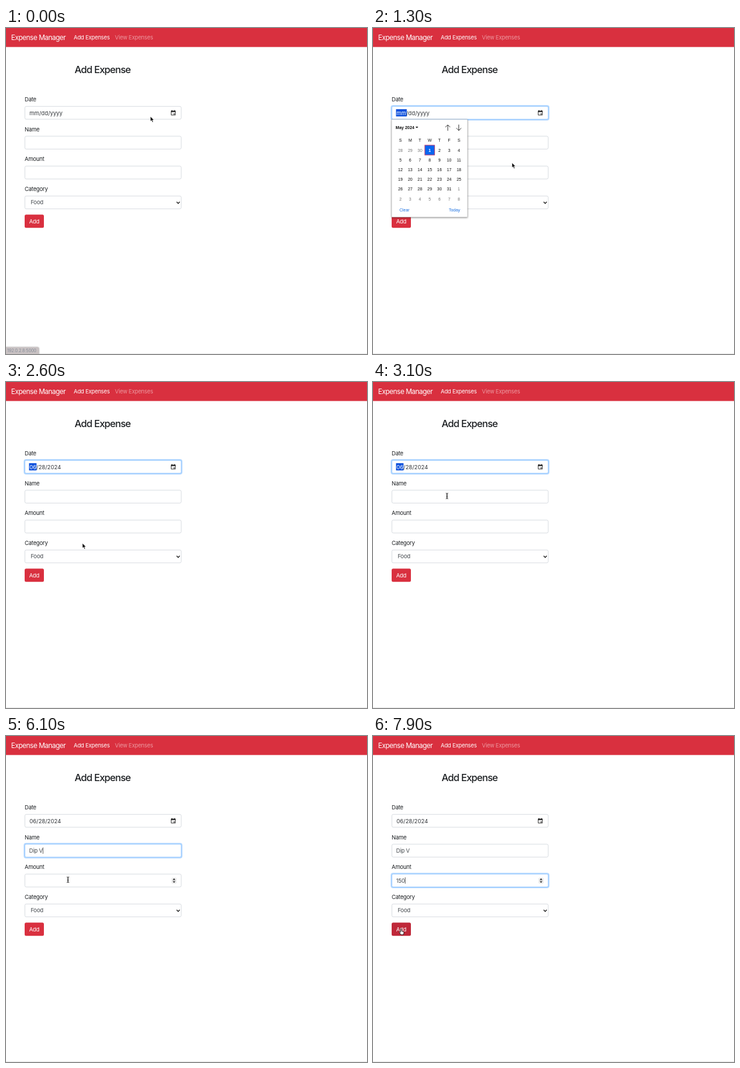
These frames come from a looping animation (600 by 542 pixels, 8000 ms). An HTML page:

```html
<!DOCTYPE html>
<html lang="en">
<head>
<meta charset="utf-8">
<title>Expense form</title>
<style>
html, body { margin: 0; width: 100%; height: 100%; overflow: hidden; background: #fff; }
svg { display: block; position: absolute; left: 0; top: 0; }
text { font: 9.25px Inter, sans-serif; letter-spacing: -.025em; fill: #1b1e21; white-space: pre; }
.brand { font-size: 11.55px; letter-spacing: -.045em; fill: #fff; }
.title { font-size: 16.2px; font-weight: 500; letter-spacing: -.05em; }
.white { fill: #fff; }
.value { fill: #43484d; }
.date { letter-spacing: 0; fill: #33373b; }
.field { fill: #fff; stroke: #ced4da; stroke-width: .8; }
.ring { fill: none; stroke: #007bff; stroke-opacity: .3; stroke-width: 2; }
.focus .field { stroke: #80bdff; }
.cal text { font: 7px "Liberation Sans", Arial, sans-serif; letter-spacing: 0; text-anchor: middle; fill: #111; }
.cal .head { font-weight: bold; text-anchor: start; }
.cal .out { fill: #777; }
.cal .picked { fill: #fff; font-weight: bold; }
.cal .link { fill: #1a6fe0; }
.line { fill: none; stroke: #222; stroke-width: .9; }
.panel { fill: #fff; filter: drop-shadow(0 1px 1.5px rgba(0,0,0,.4)); }
.hint { font-size: 7.3px; font-weight: 600; letter-spacing: 0; fill: #222; }
.status { font-size: 7px; letter-spacing: -.01em; fill: #858b97; }
</style>
</head>
<body>
<svg id="stage" width="600" height="542" viewBox="0 0 600 542"></svg>
<script>
const LOOP = 8000, STEP = 100, TEXT_X = 38.5;
const stage = document.getElementById('stage');

function el(tag, attrs, parent = stage, content) {
  const node = document.createElementNS('http://www.w3.org/2000/svg', tag);
  for (const key in attrs) node.setAttribute(key, attrs[key]);
  if (content !== undefined) node.textContent = content;
  parent.append(node);
  return node;
}
const group = (parent = stage, cls = '') => el('g', { class: cls }, parent);
const text = (x, y, str, cls = '', parent = stage) => el('text', { x, y, class: cls }, parent, str);
const rect = (x, y, width, height, attrs = {}, parent = stage) =>
  el('rect', { x, y, width, height, ...attrs }, parent);
const path = (d, attrs, parent = stage) => el('path', { d, ...attrs }, parent);
const show = (node, on) => { node.style.display = on ? '' : 'none'; };
const within = (t, a, b) => t >= a && t < b;

// Last value whose start time has passed
function valueAt(steps, t) {
  let value = steps[0][1];
  for (const [start, next] of steps) if (t >= start) value = next;
  return value;
}

// Page header
rect(0, 0, 600, 31.6, { fill: '#d9303f' });
text(8.6, 19.7, 'Expense Manager', 'brand');
text(112.5, 19.2, 'Add Expenses', 'white');
text(181, 19.2, 'View Expenses', 'white').setAttribute('opacity', .5);
text(114, 75.2, 'Add Expense', 'title');
rect(0, 541.3, 600, .7, { fill: '#ddd' });

// Form
function field(label, y) {
  text(31, y - 8, label);
  const g = group();
  const ring = rect(30.4, y - .8, 261.8, 23.6, { rx: 3, class: 'ring' }, g);
  rect(31.4, y + .3, 259.8, 21.4, { rx: 2.3, class: 'field' }, g);
  return { g, ring, y };
}
const dateField = field('Date', 130);
const nameField = field('Name', 179.6);
const amountField = field('Amount', 229.3);
const categoryField = field('Category', 279);

const mark = rect(38.3, 135, 17.8, 12, { fill: '#0b4fdc' });
const dateText = text(39, 144.5, '', 'date');
const month = el('tspan', {}, dateText);
const rest = el('tspan', {}, dateText);
path('M274.6 138.6h6.8v6.2h-6.8z', { class: 'line' });
path('M274.2 137.6h7.6v2.2h-7.6zM275.2 136.6h1.2v2h-1.2zM279.6 136.6h1.2v2h-1.2zM278.6 142h1.8v1.8h-1.8z', { fill: '#222' });

const nameText = text(TEXT_X, 194.2, '', 'value');
const amountText = text(TEXT_X, 243.9, '', 'value');
const caret = rect(0, 0, .7, 10.5, { fill: '#222' });
const spinner = group();
rect(275, 235.4, 8.6, 10, { rx: 2, fill: '#ececec' }, spinner);
path('M277 239.4l2.3-2.8 2.3 2.8zM277 241.4l2.3 2.8 2.3-2.8z', { fill: '#333' }, spinner);

text(41, 293.4, 'Food', 'value');
path('M283.6 289l2.6 2.7 2.6-2.7', { class: 'line', style: 'stroke-width:1.3' });
const button = rect(31, 310.3, 32, 22, { rx: 2.5 });
text(38.4, 324.8, 'Add', 'white');

// Calendar popup
function calendar(title, monthIndex, firstDay) {
  const g = group(stage, 'cal');
  rect(31, 152, 126, 162.3, { class: 'panel', stroke: '#a9a9a9', 'stroke-width': .5 }, g);
  const head = text(37.6, 167.6, title, 'head', g);
  const tipX = 39.6 + head.getComputedTextLength();
  path(`M${tipX} 164h4.4l-2.2 2.6z`, { fill: '#111' }, g);
  path('M124.3 170.8v-9.8m-4 4l4-4 4 4M142.6 160.6v9.8m-4-4l4 4 4-4', { class: 'line' }, g);
  const colX = i => 45.6 + 16.2 * (i % 7);
  const pick = rect(0, 0, 16.2, 16.2, { fill: '#0a66f0' }, g);
  if (monthIndex === 4) pick.setAttribute('stroke', '#c43a6c');
  [...'SMTWTFS'].forEach((day, i) => text(colX(i), 189, day, '', g));
  const cells = [];
  for (let i = 0; i < 42; i++) {
    const day = new Date(Date.UTC(2024, monthIndex, firstDay + i));
    const inside = day.getUTCMonth() === monthIndex;
    const y = 203 + 16.2 * Math.floor(i / 7);
    const node = text(colX(i), y + 2.5, day.getUTCDate(), inside ? '' : 'out', g);
    if (inside) cells[day.getUTCDate()] = { node, x: colX(i), y };
  }
  text(52.3, 304.5, 'Clear', 'link', g);
  text(135.3, 304.5, 'Today', 'link', g);
  return {
    g,
    select(day) {
      cells.forEach((cell, d) => cell.node.setAttribute('class', d === day ? 'picked' : ''));
      pick.setAttribute('x', cells[day].x - 8.1);
      pick.setAttribute('y', cells[day].y - 8.1);
    }
  };
}
const may = calendar('May 2024', 4, -2);
const june = calendar('June 2024', 5, -5);
may.select(1);

// Suggestion lists under the text inputs
function hints(y, items) {
  const g = group();
  const panel = group(g, 'panel');
  rect(88, y, 90, items.length * 20.8 + 4.4, { rx: 4 }, panel);
  path(`M97 ${y}l3-3 3 3z`, {}, panel);
  items.forEach((item, i) => text(95, y + 15.3 + 20.8 * i, item, 'hint', g));
  return g;
}
const nameHints = hints(207, ['Quiv', 'Shelf & Bag', 'Corvane', 'Glydek', 'Gas', 'Pizza']);
const amountHints = hints(256.7, ['25']);

const status = group();
path('M0 530.5h52q3 0 3 3v8.500h-55z', { fill: '#c9c2c3', style: 'filter:drop-shadow(0 0 1px rgba(0,0,0,.3))' }, status);
text(2, 539.2, '192.0.2.8:5000', 'status', status);

// Pointers, each with its hot spot at 0,0
const outline = { stroke: '#fff', 'stroke-width': .7, 'stroke-linejoin': 'round' };
const pointers = {
  arrow: path('M0 0v8.300l1.900-1.700 1.400 3.200 1.500-.7-1.400-3h2.500z', { fill: '#000', ...outline }),
  beam: path('M-2-4.700q2 0 2 1.200v7q0 1.200-2 1.200M2-4.700q-2 0-2 1.200v7q0 1.200 2 1.200M-1 .8h2', { class: 'line' }),
  hand: path('M-.9.700q.9-1.400 1.800 0v3.300l3 .7q1.200.4 1 1.800l-.8 3.300h-4.200l-2.700-3.700q-.3-1.200.9-1l1 .9z',
    { fill: '#fff', stroke: '#000', 'stroke-width': .8, 'stroke-linejoin': 'round' })
};

// time, x, y
const route = [
  [0, 240, 147], [300, 275, 141], [700, 278, 141], [900, 281, 143], [1000, 278, 146],
  [1100, 267, 162], [1200, 267, 162], [1300, 231, 224], [1500, 178, 190], [1700, 142, 166],
  [1800, 142, 166], [2000, 127, 175], [2200, 127, 205], [2400, 127, 268], [2600, 127, 268],
  [2900, 122, 214], [3000, 121, 202], [3100, 123, 189.5], [5700, 123, 189.5], [6000, 103, 239],
  [7300, 103, 239], [7500, 86, 272], [7700, 52, 316], [7800, 46.500, 320.500], [8000, 46.500, 320.500]
];
function pointerAt(t) {
  const i = Math.max(1, route.findIndex(p => p[0] > t));
  const [t0, x0, y0] = route[i - 1], [t1, x1, y1] = route[i];
  const k = (t - t0) / (t1 - t0);
  return [x0 + (x1 - x0) * k, y0 + (y1 - y0) * k];
}

const dates = [[0, 'mm/dd/yyyy'], [1700, '06/01/2024'], [2500, '06/28/2024']];
const names = [[0, ''], [4600, 'D'], [4900, 'Di'], [5000, 'Dip'], [5300, 'Dip V']];
const amounts = [[0, ''], [6700, '1'], [6800, '15'], [7000, '150']];
const blinks = [[0, 0], [3300, 1], [3600, 0], [3900, 1], [4300, 0], [4600, 1], [5700, 0],
  [6000, 1], [6500, 0], [6700, 1], [7300, 0], [7600, 1]];

function focusField(f, on) {
  f.g.setAttribute('class', on ? 'focus' : '');
  show(f.ring, on);
}

function render(t) {
  const dateOn = within(t, 600, 3300), nameOn = within(t, 3300, 6200), amountOn = t >= 6200;
  focusField(dateField, dateOn);
  focusField(nameField, nameOn);
  focusField(amountField, amountOn);
  focusField(categoryField, false);

  const date = valueAt(dates, t);
  month.textContent = date.slice(0, 2);
  rest.textContent = date.slice(2);
  month.style.fill = dateOn ? '#fff' : '';
  show(mark, dateOn);
  mark.setAttribute('width', t < 1700 ? 17.8 : 12.4);

  nameText.textContent = valueAt(names, t);
  amountText.textContent = valueAt(amounts, t);
  const typed = amountOn ? amountText : nameText;
  const width = typed.textContent ? typed.getComputedTextLength() : 0;
  caret.setAttribute('x', TEXT_X + .2 + width);
  caret.setAttribute('y', amountOn ? 235 : 185.3);
  show(caret, valueAt(blinks, t));

  const open = within(t, 700, 2600);
  show(may.g, open && t < 1700);
  show(june.g, open && t >= 1700);
  june.select(t < 2500 ? 1 : 28);
  show(nameHints, within(t, 3400, 4600));
  show(amountHints, within(t, 6300, 6700));
  status.setAttribute('opacity', Math.max(0, 1 - t / 300));

  const [x, y] = pointerAt(t);
  const over = f => within(x, 31, 291.500) && within(y, f.y, f.y + 22) && !(open && x < 157);
  const onButton = within(x, 31, 63) && within(y, 310, 332);
  const kind = onButton ? 'hand' : over(nameField) || over(amountField) ? 'beam' : 'arrow';
  const hidden = within(t, 4600, 5700) || within(t, 6700, 7300);
  for (const key in pointers) {
    show(pointers[key], key === kind && !hidden);
    pointers[key].setAttribute('transform', `translate(${x} ${y})`);
  }
  show(spinner, amountOn || over(amountField));
  button.setAttribute('fill', onButton ? '#bf2839' : '#d9303f');
}

const begin = performance.now();
function tick() {
  const t = (performance.now() - begin) % LOOP;
  render(Math.floor(t / STEP) * STEP);
  requestAnimationFrame(tick);
}
tick();
</script>
</body>
</html>
```
